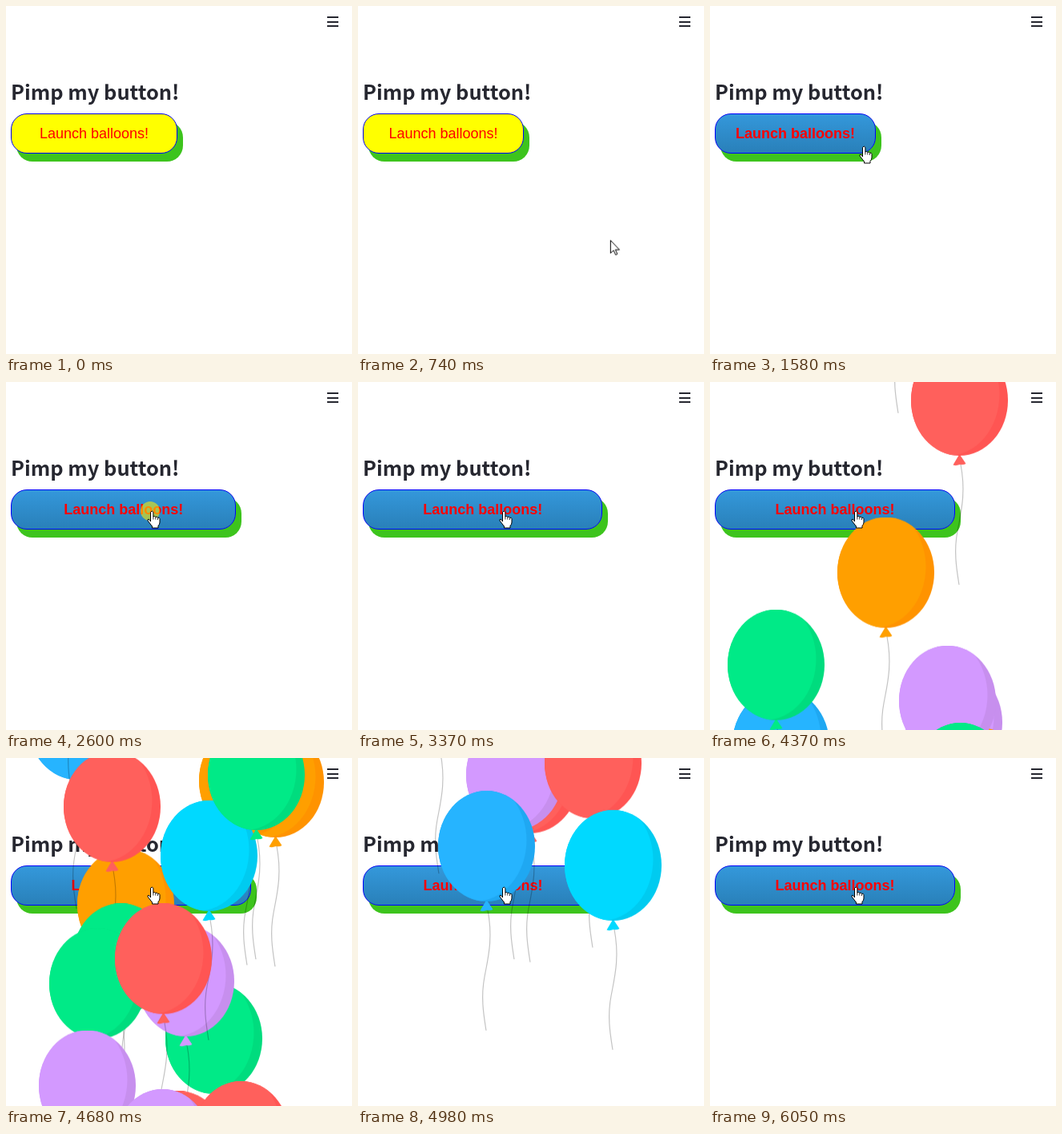
Recreate the animation shown at these times as an HTML page. Size 432x434 px, loop 6910 ms.

```html
<!DOCTYPE html>
<html lang="en">
<head>
<meta charset="utf-8">
<title>Pimp my button!</title>
<style>
  :root { --loop: 6910ms; }
  html, body { margin: 0; width: 100%; height: 100%; overflow: hidden; background: #fff; }
  svg { position: absolute; left: 0; top: 0; width: 432px; height: 434px; overflow: hidden; }
  h3 {
    position: absolute; left: 6px; top: 87px; margin: 0;
    font: bold 25.4px/38px "Noto Sans CJK JP", "Noto Sans CJK SC", "Noto Sans CJK", "Noto Sans", sans-serif;
    color: #262730; white-space: nowrap;
  }
  .button {
    position: absolute; left: 6px; top: 134px; width: 201px; height: 50px;
    box-sizing: border-box; border: 1px solid #00f; border-radius: 20px;
    background-color: #ff0; box-shadow: 7px 10px #3dc41d;
    font: 18px/48px "Liberation Sans", Arial, sans-serif;
    color: #f00; text-align: center; white-space: nowrap;
    animation: stretch var(--loop) infinite, hover var(--loop) step-end infinite;
  }
  @keyframes stretch {
    0% { width: 208px; animation-timing-function: cubic-bezier(.25, .5, .5, 1); }
    9.7% { width: 201px; }
    22.865% { width: 201px; animation-timing-function: ease; }
    51.81%, 100% { width: 300px; }
  }
  @keyframes hover {
    0% { background-image: none; font-weight: 400; }
    22.8%, 100% { background-image: linear-gradient(#3498db, #2980b9); font-weight: 700; }
  }

  .balloon { animation: rise var(--loop) infinite backwards; }
  @keyframes rise {
    0% { transform: translateY(640px); animation-timing-function: ease-in; }
    10.854%, 100% { transform: translateY(-300px); }
  }

  .cursor { animation: move var(--loop) linear infinite; }
  @keyframes move {
    0% { transform: translate(390px, 440px); }
    5.6% { transform: translate(354px, 350px); }
    10.7% { transform: translate(315px, 292px); }
    16.35% { transform: translate(270px, 230px); }
    21.85% { transform: translate(200px, 184px); }
    22.865% { transform: translate(192px, 175px); animation-timing-function: ease-out; }
    31%, 100% { transform: translate(182px, 161px); }
  }
  .arrow { animation: arrow var(--loop) step-end infinite; }
  .hand { animation: hand var(--loop) step-end infinite; }
  @keyframes arrow { 0% { opacity: 1; } 22.8%, 100% { opacity: 0; } }
  @keyframes hand { 0% { opacity: 0; } 22.8%, 100% { opacity: 1; } }
  .click { opacity: 0; animation: click var(--loop) infinite; }
  @keyframes click {
    0%, 36.2% { opacity: 0; }
    36.7%, 38.6% { opacity: .58; }
    40.5%, 100% { opacity: 0; }
  }
</style>
</head>
<body>
<h3>Pimp my button!</h3>
<div class="button">Launch balloons!</div>

<svg viewBox="0 0 432 434">
  <defs>
    <clipPath id="body"><ellipse cx="60.5" cy="69" rx="60.5" ry="69"/></clipPath>
    <g id="balloon">
      <path d="M62 149C69 185 62 210 58 232C53 258 57 280 60 299" fill="none" stroke="#000" stroke-opacity=".24" stroke-width="1.2"/>
      <path d="M60.5 136L68.5 148Q65 150 61 149Q56 151 52.5 149.5Z" style="fill:var(--main)"/>
      <ellipse cx="60.5" cy="69" rx="60.5" ry="69" style="fill:var(--shade)"/>
      <ellipse cx="46" cy="62" rx="64.5" ry="76" clip-path="url(#body)" style="fill:var(--main)"/>
    </g>
  </defs>

  <path d="M401 14h14M401 20h14M401 25h14" stroke="#262730" stroke-width="2"/>

  <g id="sky"></g>

  <g class="cursor">
    <circle class="click" cx="-2" cy="0" r="12" fill="#ffee00"/>
    <path class="arrow" d="M.5 .5V16.5L4.2 13L6.8 18.6L9 17.6L6.5 12.2H11.6Z" fill="#fff" stroke="#000"/>
    <g class="hand" transform="translate(-6 -1)" stroke="#000" stroke-linejoin="round">
      <path d="M4.5 14V2.3Q6.2-.3 7.9 2.3V8Q9.5 6.6 10.8 8.4Q12.4 7.4 13.4 9.2Q15.6 8.6 16 10.6V15Q16 17.5 14 19.5V22H6.5V20Q4.5 17.5 1.2 13.2Q.4 11 2.2 11.2Q3.5 11.8 4.5 14Z" fill="#fff"/>
      <path d="M7.9 8V11.5M10.8 8.6V11.5M13.4 9.4V12" fill="none" stroke-width=".8"/>
    </g>
  </g>
</svg>

<script>
  const colors = {
    purple: ['#d399ff', '#c78fee'],
    red: ['#ff605c', '#ff5553'],
    cyan: ['#00d9ff', '#00cbf0'],
    blue: ['#26b4ff', '#1fa8f2'],
    orange: ['#ff9f00', '#ff9300'],
    green: ['#00ea87', '#00dc7e']
  };

  // colour, left edge, launch time in ms; back to front
  const balloons = [
    ['purple', 21, 3507], ['blue', 27, 3589], ['purple', 154, 3596], ['red', 148, 3546],
    ['orange', 246, 3664], ['cyan', 175, 3640], ['cyan', 291, 3572], ['red', 251, 3751],
    ['orange', 159, 3877], ['blue', 28, 4026], ['green', 22, 3953], ['purple', 244, 4005],
    ['orange', 276, 4065], ['orange', 241, 4064], ['purple', 236, 3985],
    ['orange', 89, 4153], ['red', 72, 4082], ['green', 83, 4195], ['green', 54, 4215],
    ['green', 199, 4261], ['purple', 164, 4213], ['cyan', 193, 4117], ['green', 252, 4060],
    ['red', 136, 4195], ['purple', 41, 4303], ['red', 155, 4362], ['purple', 135, 4360],
    ['red', 233, 4352], ['blue', 100, 4410], ['cyan', 258, 4424]
  ];

  const sky = document.getElementById('sky');
  for (const [color, left, launch] of balloons) {
    const el = document.createElementNS('http://www.w3.org/2000/svg', 'use');
    const [main, shade] = colors[color];
    el.setAttribute('href', '#balloon');
    el.setAttribute('x', left);
    el.setAttribute('class', 'balloon');
    el.style.setProperty('--main', main);
    el.style.setProperty('--shade', shade);
    el.style.animationDelay = launch + 'ms';
    sky.append(el);
  }
</script>
</body>
</html>
```
